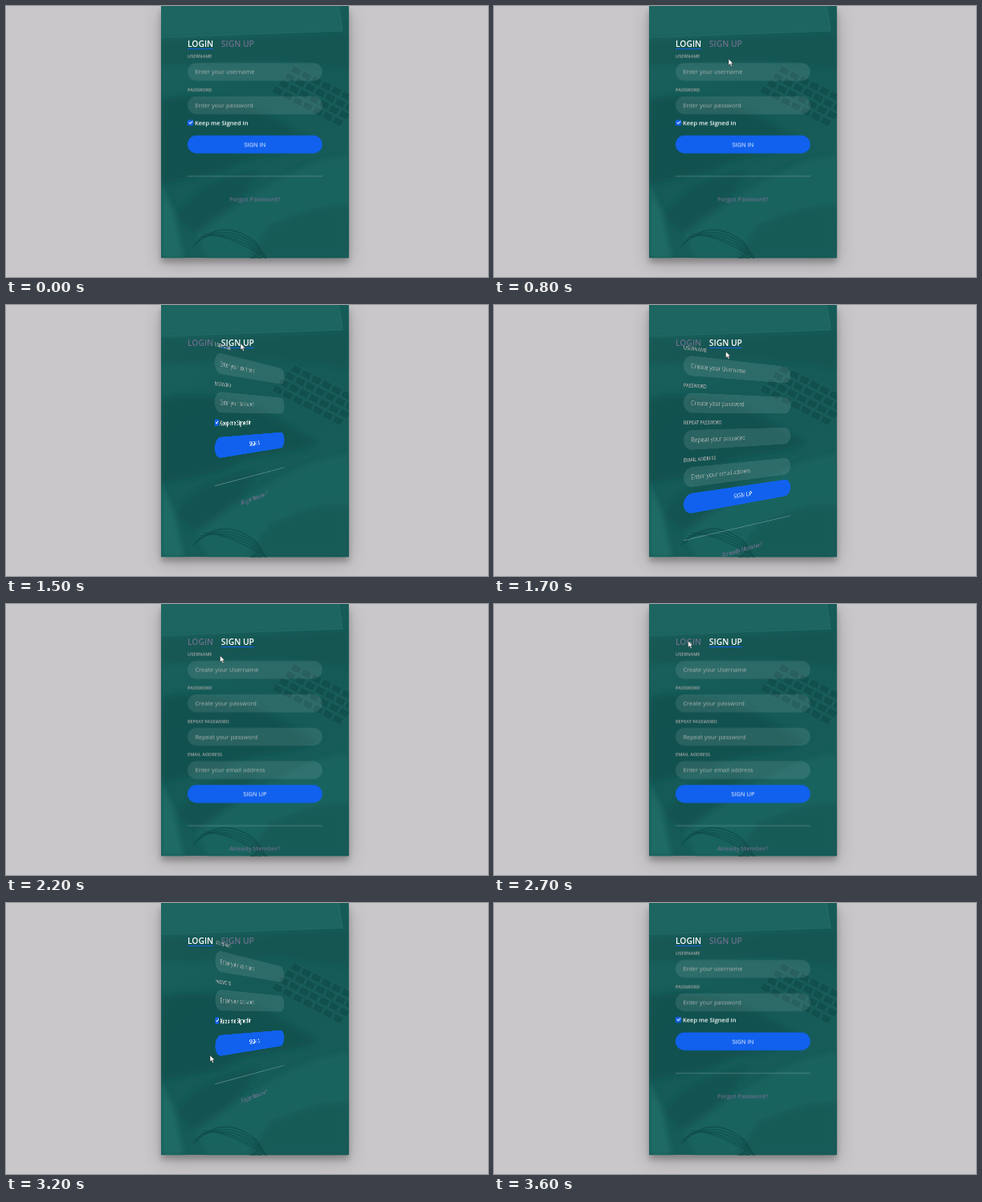
These frames come from a looping animation (600x338 px, 3700 ms). An HTML page:

```html
<!DOCTYPE html>
<html lang="en">
<head>
<meta charset="utf-8">
<title>Login form flip</title>
<style>
  * { box-sizing: border-box; }
  html, body { margin: 0; width: 100%; height: 100%; overflow: hidden; background: #c9c7c9; }
  /* The page is laid out at 1280px and shown at 600px. */
  .page {
    position: absolute; left: 0; top: 0; width: 1280px; height: 721px;
    transform: scale(.46875); transform-origin: 0 0;
    font: 600 16px/18px "Open Sans", sans-serif; color: #6a6f8c;
  }
  .panel {
    position: absolute; left: 412px; top: 0; width: 498px; height: 670px; background: #155b58;
    box-shadow: 0 12px 15px rgba(0,0,0,.24), 0 17px 50px rgba(0,0,0,.19);
  }
  .photo { position: absolute; width: 100%; height: 100%; }
  .tabs { position: absolute; left: 70px; top: 90px; font-size: 22px; white-space: nowrap; }
  .tab {
    display: inline-block; margin-right: 15px; padding-bottom: 5px;
    border-bottom: 2px solid transparent;
  }
  .tab.on { color: #fff; border-color: #1161ee; }
  .forms { position: absolute; left: 70px; right: 70px; top: 125px; height: 345px; perspective: 1000px; }
  .form { position: absolute; inset: 0; backface-visibility: hidden; }
  .label { height: 18px; margin-bottom: 8px; font-size: 12px; color: #aaa; }
  .input, .button {
    height: 48px; padding: 15px 20px; border-radius: 25px; font-weight: 400;
  }
  .input { margin-bottom: 15px; background: rgba(255,255,255,.1); color: #a9b3b1; }
  .button { background: #1161ee; color: #fff; text-align: center; }
  .keep { height: 18px; margin-bottom: 23px; color: #fff; white-space: nowrap; }
  .icon {
    position: relative; display: inline-block; width: 15px; height: 15px;
    border-radius: 2px; background: #1161ee;
  }
  .icon::before, .icon::after { content: ""; position: absolute; height: 2px; background: #fff; }
  .icon::before { left: 3px; bottom: 6px; width: 5px; transform: rotate(45deg); }
  .icon::after { right: 0; top: 6px; width: 10px; transform: rotate(-45deg); }
  .rule { height: 2px; margin: 60px 0 50px; background: rgba(255,255,255,.25); }
  .foot { text-align: center; }
  .cursor { position: absolute; left: 0; top: 0; width: 8px; height: 11px; overflow: visible; }
</style>
</head>
<body>
<div class="page">
  <div class="panel">
    <svg class="photo" viewBox="193 0 233.5 314" preserveAspectRatio="none">
      <defs>
        <linearGradient id="base" x1="0" y1="0" x2=".5" y2="1">
          <stop offset="0" stop-color="#1c6460"/>
          <stop offset=".45" stop-color="#155a57"/>
          <stop offset="1" stop-color="#175c59"/>
        </linearGradient>
        <filter id="soft" x="-20%" y="-20%" width="140%" height="140%"><feGaussianBlur stdDeviation="3"/></filter>
      </defs>
      <rect x="193" width="234" height="314" fill="url(#base)"/>
      <path d="M193 0H414L419 31 193 39Z" fill="#1d6561"/>
      <path d="M414 0L419 31 193 39" fill="none" stroke="#2a706b" stroke-width=".8"/>
      <path d="M193 42L427 36V78L345 66 193 74Z" fill="#13534f" opacity=".6" filter="url(#soft)"/>
      <g id="keys" fill="#104d4a" stroke="#2a6d69" stroke-width=".5" opacity=".75"></g>
      <g filter="url(#soft)">
        <path d="M193 118C240 104 300 118 352 151L386 172C350 190 300 182 270 206L193 222Z" fill="#114f4c" opacity=".75"/>
        <path d="M193 222L208 254 222 314H193Z" fill="#23706a" opacity=".75"/>
        <path d="M427 186C380 190 330 220 300 240L236 286 250 314H427Z" fill="#1c6662" opacity=".75"/>
        <path d="M427 250C390 245 360 262 330 272L300 314H427Z" fill="#145552" opacity=".6"/>
        <path d="M212 262C232 228 270 214 312 206L292 240 234 282Z" fill="#12524f" opacity=".7"/>
      </g>
      <g id="bands" fill="none" stroke="#0f4946" stroke-width="1.1" opacity=".8"></g>
    </svg>
    <div class="tabs"><span class="tab">LOGIN</span> <span class="tab">SIGN UP</span></div>
    <div class="forms">
      <div class="form" id="signIn"></div>
      <div class="form" id="signUp"></div>
    </div>
  </div>
</div>
<svg class="cursor" viewBox="0 0 8 11">
  <path d="M0 0V8L1.9 6.3 3.2 9.4 4.6 8.8 3.3 5.8H5.8Z" fill="#fff" stroke="#222" stroke-width=".5"/>
</svg>
<script>
const LOOP = 3700, STEP = 100, TURN = 440;
const TO_SIGN_UP = 1354, TO_LOGIN = 2907;
const $ = s => document.querySelector(s);

const field = ([label, hint]) => `<div class="label">${label}</div><div class="input">${hint}</div>`;
const form = (fields, extra, action, foot) =>
  fields.map(field).join("") + extra +
  `<div class="button">${action}</div><div class="rule"></div><div class="foot">${foot}</div>`;

const signIn = $("#signIn"), signUp = $("#signUp"), cursor = $(".cursor");
const tabs = document.querySelectorAll(".tab");

signIn.innerHTML = form(
  [["USERNAME", "Enter your username"], ["PASSWORD", "Enter your password"]],
  '<div class="keep"><span class="icon"></span> Keep me Signed in</div>',
  "SIGN IN", "Forgot Password?");
signUp.innerHTML = form(
  [["USERNAME", "Create your Username"], ["PASSWORD", "Create your password"],
   ["REPEAT PASSWORD", "Repeat your password"], ["EMAIL ADDRESS", "Enter your email address"]],
  "", "SIGN UP", "Already Member?");

// Keyboard and bracelets of the backdrop
let keys = "", bands = "";
for (let row = 0; row < 4; row++)
  for (let col = 0; col < 7; col++)
    keys += `<rect x="${col * 14 - row * 3}" y="${row * 11}" width="12" height="9" rx="1.5"
      transform="translate(358 74) rotate(27)"/>`;
for (let i = 0; i < 5; i++)
  bands += `<path d="M${233 + i * 3} ${300 - i * 4}Q${262 + i * 2} ${268 + i * 4} ${296 + i * 3} ${285 + i * 5}T${303 + i} 316"/>`;
$("#keys").innerHTML = keys;
$("#bands").innerHTML = bands;

// Pointer path: time, x, y
const path = [
  [100, 328, 320], [300, 314, 190], [500, 299, 84], [600, 294, 69], [800, 292, 66],
  [1000, 292, 58], [1200, 292, 48], [1500, 292, 48], [1700, 288.5, 58], [2000, 275, 64],
  [2200, 266.5, 64.5], [2400, 251, 52], [2600, 242, 45], [2900, 241, 48],
  [3000, 243.5, 69.5], [3200, 254, 190], [3400, 262, 310]
];

function pointAt(t) {
  const i = path.findIndex((p, k) => k && t <= p[0]);
  if (i < 0 || t < path[0][0]) return null;
  const [a, b] = [path[i - 1], path[i]], u = (t - a[0]) / (b[0] - a[0]);
  return [a[1] + (b[1] - a[1]) * u, a[2] + (b[2] - a[2]) * u];
}

const progress = (t, start) => Math.min(1, Math.max(0, (t - start) / TURN));

function draw(t) {
  const flip = 180 * (progress(t, TO_SIGN_UP) - progress(t, TO_LOGIN));
  signIn.style.transform = `rotateY(${flip}deg)`;
  signUp.style.transform = `rotateY(${180 - flip}deg)`;

  const up = t >= TO_SIGN_UP && t < TO_LOGIN;
  tabs[0].classList.toggle("on", !up);
  tabs[1].classList.toggle("on", up);

  const p = pointAt(t);
  cursor.style.display = p ? "" : "none";
  if (p) cursor.style.transform = `translate(${p[0]}px, ${p[1]}px)`;
}

const start = performance.now();
function tick(now) {
  const t = Math.max(0, now - start) % LOOP;
  draw(Math.floor(t / STEP) * STEP);
  requestAnimationFrame(tick);
}
draw(0);
requestAnimationFrame(tick);
</script>
</body>
</html>
```
